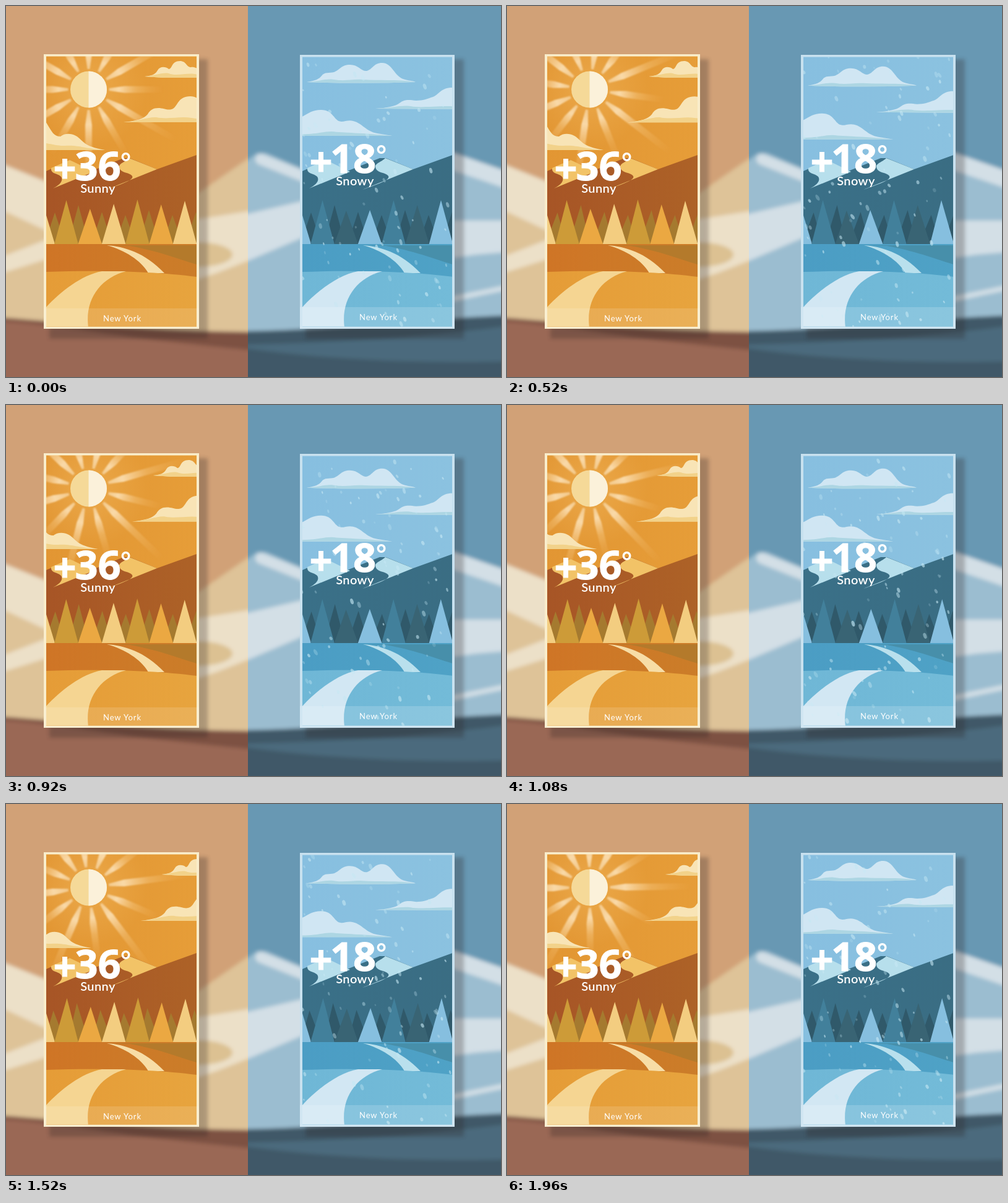
Write an HTML page that moves like this. It is 800 px wide and 600 px high and loops after 2000 ms.

```html
<!DOCTYPE html>
<html lang="en">
<head>
<meta charset="utf-8">
<title>Weather cards</title>
<style>
  html, body { margin: 0; width: 100%; height: 100%; overflow: hidden; }
  svg { display: block; width: 800px; height: 600px; }
  text { font-family: Lato, "Open Sans", sans-serif; fill: #fff; text-anchor: middle; }
  .big { font-family: "Open Sans", "Noto Sans", sans-serif; font-size: 65px; font-weight: 700; stroke: #fff; }
  .deg { font-size: 40px; font-weight: 700; }
  .sky { font-size: 20px; font-weight: 600; letter-spacing: .4px; }
  .city { font-size: 13px; letter-spacing: .9px; }
</style>
</head>
<body>
<svg id="stage" viewBox="0 0 800 600" xmlns="http://www.w3.org/2000/svg"></svg>
<script>
const LOOP = 2000, STEP = 40;
const stage = document.getElementById('stage');

let seed = 7;
const rnd = () => (seed = (seed * 16807) % 2147483647) / 2147483647;
const range = (a, b) => a + (b - a) * rnd();

const path = (d, fill, extra = '') => `<path d="${d}" fill="${fill}" ${extra}/>`;
const rect = (x, y, w, h, fill, extra = '') =>
  `<rect x="${x}" y="${y}" width="${w}" height="${h}" fill="${fill}" ${extra}/>`;
const line = (d, color, width) =>
  `<path d="${d}" fill="none" stroke="${color}" stroke-width="${width}" stroke-linecap="round"/>`;
const label = (x, y, cls, s) => `<text x="${x}" y="${y}" class="${cls}">${s}</text>`;
const gradient = (id, a, b, dir = 'x2="1" y2="0"') =>
  `<linearGradient id="${id}" ${dir}><stop stop-color="${a}"/><stop offset="1" stop-color="${b}"/></linearGradient>`;

const warm = {
  id: 'w', x: 0, top: 78, width: 251, strip: 489, stripAlpha: .13, border: '#f9edcb',
  sky: ['#e29633', '#e69d38'], rock: ['#a75526', '#ad6227'], snow: '#f2c367',
  backTree: '#a57a2f', front: ['#cd9b38', '#eba842', '#f3cd80', '#cd9b38', '#eba842', '#f3cd80'],
  tips: [314, 328, 320, 313, 321, 315],
  field: ['#cf7526', '#cb7d29'], slope: '#b47a2b', near: ['#e59c37', '#e7a43e'],
  road: '#f5d592', farRoad: '#f7dda6'
};
const cold = {
  id: 'c', x: 414, top: 79, width: 250, strip: 487, stripAlpha: .16, border: '#c8e1ef',
  sky: ['#87bfe0', '#8bc2e0'], rock: ['#3a7088', '#3a6d83'], snow: '#b7dfec',
  backTree: '#30596a', front: ['#42809b', '#396474', '#86bfdf', '#42809b', '#396474', '#86bfdf'],
  tips: [314, 331, 330, 314, 322, 314],
  field: ['#4b9dc4', '#4fa2c6'], slope: '#478faa', near: ['#6fb7d6', '#73bbd8'],
  road: '#d2e7f3', farRoad: '#b9e0ed'
};

function backdrop() {
  const left = rect(-20, -20, 440, 640, '#d1a177') +
    path('M-20 250L61 283L200 380L312 302L391 247L420 228V620H-20Z', '#dec398') +
    path('M-20 250L0 258L80 290V370L0 333L-20 325Z', '#ece0c8') +
    path('M-20 410L0 403L80 372V405L0 430L-20 435Z', '#ece0c8') +
    path('M290 348L391 332L420 328V400L391 412L340 432L290 448Z', '#ece0c8') +
    `<ellipse cx="308" cy="402" rx="58" ry="20" fill="#dcc192"/>` +
    path('M-20 503C100 512 250 526 391 527H420V620H-20Z', '#7d5143') +
    path('M-20 509C60 513 120 525 200 535S350 552 391 556L420 558V620H-20Z', '#9a6754');
  const right = rect(370, -20, 450, 640, '#6798b3') +
    path('M370 264L406 238H420L480 264L600 340L715 244H735L820 272V620H370Z', '#9bbdd0') +
    line('M412 248L490 279', '#d3dfe6', 18) +
    line('M715 249L820 285', '#d3dfe6', 27) +
    path('M370 341L391 336L490 313V370L391 412L370 420Z', '#d3dfe6') +
    path('M715 347H820V397L760 402L715 408Z', '#d3dfe6') +
    line('M715 475L820 453', '#d3dfe6', 8) +
    path('M370 526C520 526 650 506 820 500V620H370Z', '#3f5868') +
    path('M370 548C500 545 650 540 820 516V574C700 579 520 574 370 551Z', '#4b6a7d');
  return `<g clip-path="url(#leftHalf)"><g filter="url(#soft)">${left}</g></g>
    <g clip-path="url(#rightHalf)"><g filter="url(#soft)">${right}</g></g>`;
}

function land(p) {
  const url = k => `url(#${p.id}${k})`;
  return path('M65 267L74 263L103 249L135 268L190 246L200 246L244 264L308 241V390H65Z', url('rock')) +
    path('M73 262L103 249L142 268L76 295C88 289 93 282 89 276C83 270 72 272 73 262Z', p.snow) +
    path('M199 246L244 264L162 297C190 287 207 281 204 275C199 268 183 271 183 259C184 254 193 252 199 246Z', p.snow) +
    `<g id="${p.id}trees"></g>` +
    rect(65, 385, 243, 60, url('field')) +
    path('M165 387H308V418C275 408 245 396 200 388Z', p.slope) +
    path('M163 387C190 389 224 398 256 432H230C218 411 192 395 163 387Z', p.farRoad) +
    path('M65 430C150 427 240 429 308 438V520H65Z', url('near')) +
    path('M194 429H155C122 435 88 462 65 487V520H133C127 475 152 440 194 429Z', p.road);
}

// Trees keep their feet still while the tips sway.
function trees(p, t) {
  const sway = Math.sin(2 * Math.PI * t);
  const tree = (x, y, half, fill, lean) =>
    path(`M${x - half} 385L${x + lean} ${y}L${x + half} 385Z`, fill);
  const backs = [334, 322, 333, 338, 330, 338, 333]
    .map((y, i) => tree(79 + 38 * i, y, 17, p.backTree, 2.5 * sway)).join('');
  const fronts = p.tips
    .map((y, i) => tree(97.5 + 38.3 * i, y, 19.3, p.front[i], -sway)).join('');
  return backs + tree(60, 322, 19, p.front[2], 0) + fronts;
}

const cloud = (id, body, shade, colors) =>
  `<g id="${id}">${path(body, colors[0])}${path(shade, colors[1])}</g>`;

function warmSky() {
  const c = ['#f8e4b6', '#f2d28a'];
  let rays = '';
  for (let i = 0; i < 12; i++) {
    const end = i % 2 ? 165 : 122;
    rays += path(`M33 -2L58 -5.5L${end} -5V5L58 5.5L33 2Z`, 'url(#ray)', `transform="rotate(${i * 30})"`);
  }
  return `<g transform="translate(133.5 135)">
      <circle r="95" fill="url(#halo)"/>
      <g id="rays" filter="url(#glow)">${rays}</g>
      <circle r="29.5" fill="#f5d998"/><path d="M0-29.5A29.5 29.5 0 0 1 0 29.5Z" fill="#fbf1da"/></g>` +
    cloud('wa', 'M224 114C236 113 242 110 245 104C249 97 258 98 263 102C269 102 267 89 281 89C292 89 291 99 299 99C306 98 314 103 322 110L340 116H255Z',
      'M224 114C240 113 252 107 263 109C275 114 290 108 305 110L340 116H255Z', c) +
    cloud('wb', 'M190 188C212 186 223 182 229 175C233 168 238 165 246 165C256 165 262 170 270 166C278 161 278 146 298 146C318 146 316 168 345 188Z',
      'M190 188C213 187 228 179 243 180C262 184 280 178 300 181L345 188Z', c) +
    cloud('wc', 'M20 233V170C45 170 58 177 66 190C74 203 77 211 88 211C94 206 104 205 113 210C125 217 124 227 160 233Z',
      'M20 233V222C60 216 76 227 95 226C115 224 130 231 160 233Z', c);
}

function coldSky() {
  const c = ['#d0e6f3', '#add6e3'];
  return cloud('ca', 'M72 123C86 121 92 118 96 113C101 106 108 109 116 107C126 103 128 95 142 95C156 95 160 106 169 105C178 103 180 92 194 92C211 92 213 115 231 119C238 121 244 121 248 123Q160 126 72 123Z',
      'M72 123C92 122 102 117 116 119C135 122 145 118 162 119C190 121 215 118 248 123Q160 126 72 123Z', c) +
    cloud('cb', 'M183 166C201 165 216 162 222 157C231 150 238 152 249 153C260 153 267 150 276 147C286 143 289 132 307 132H330V167Z',
      'M183 166C210 165 222 160 240 162C260 166 280 160 330 163V167Z', c) +
    cloud('cc', 'M50 210V185C72 178 76 168 95 168C116 168 115 186 128 187C134 187 140 184 147 186C161 189 168 203 186 206L210 210Z',
      'M50 210V207C85 209 95 203 112 203C132 205 160 205 210 210Z', c);
}

function card(p, sky, texts) {
  const pane = `${p.id}pane`;
  return `<g transform="translate(${p.x} 0)">
    <clipPath id="${pane}">${rect(65, p.top + 3.5, p.width - 8, 518.5 - p.top - 3.5, '#000')}</clipPath>
    ${rect(70, 86, 256, 452, '#2b2320', 'opacity=".27" filter="url(#shadow)"')}
    ${rect(61, p.top, p.width, 522 - p.top, p.border)}
    <g clip-path="url(#${pane})">${rect(65, 81, 243, 438, `url(#${p.id}sky)`)}${sky}${land(p)}
      ${p === cold ? '<g id="snow"></g>' : ''}</g>
    ${rect(61, p.strip, p.width, 522 - p.strip, '#fff', `opacity="${p.stripAlpha}"`)}
  </g>${texts}`;
}

const flakes = Array.from({ length: 90 }, () => ({
  x: range(62, 312), y: range(0, 450), drift: range(-14, 8),
  size: range(1.1, 2.8), long: range(1.2, 2.1), tilt: range(-38, -12), alpha: range(.18, .65)
}));

function snow(t) {
  return flakes.map(f => {
    const y = (f.y + 450 * t) % 450, x = f.x + f.drift * Math.sin(Math.PI * y / 450);
    return `<ellipse rx="${f.size}" ry="${f.size * f.long}" opacity="${f.alpha}" ` +
      `transform="translate(${x} ${75 + y}) rotate(${f.tilt})"/>`;
  }).join('');
}

const cardGradients = p => gradient(p.id + 'sky', ...p.sky) + gradient(p.id + 'rock', ...p.rock) +
  gradient(p.id + 'field', ...p.field) + gradient(p.id + 'near', ...p.near);
const blur = (id, d, area = '') => `<filter id="${id}" ${area}><feGaussianBlur stdDeviation="${d}"/></filter>`;

stage.innerHTML = `<defs>
  ${blur('soft', 3)}${blur('shadow', 3)}
  ${blur('glow', 1.3, 'filterUnits="userSpaceOnUse" x="-190" y="-190" width="380" height="380"')}
  <clipPath id="leftHalf">${rect(0, 0, 391, 600, '#000')}</clipPath>
  <clipPath id="rightHalf">${rect(391, 0, 409, 600, '#000')}</clipPath>
  <radialGradient id="halo"><stop offset=".25" stop-color="#f7c16a" stop-opacity=".3"/>
    <stop offset="1" stop-color="#f7c16a" stop-opacity="0"/></radialGradient>
  <linearGradient id="ray"><stop stop-color="#fff0d2" stop-opacity=".5"/>
    <stop offset=".18" stop-color="#ffeccb" stop-opacity=".75"/>
    <stop offset=".5" stop-color="#fbd69b" stop-opacity=".32"/>
    <stop offset="1" stop-color="#f5bd69" stop-opacity="0"/></linearGradient>
  ${cardGradients(warm)}${cardGradients(cold)}</defs>` +
  backdrop() +
  card(warm, warmSky(), label(95, 286, 'big', '+') + label(148.5, 282, 'big', '36') +
    label(193.5, 267, 'deg', '°') + label(148.5, 302, 'sky', 'Sunny') + label(188, 510, 'city', 'New York')) +
  card(cold, coldSky(), label(509, 275, 'big', '+') + label(561, 270, 'big', '18') +
    label(606.5, 255, 'deg', '°') + label(564, 290, 'sky', 'Snowy') + label(602, 508, 'city', 'New York'));

const el = id => document.getElementById(id);
el('snow').setAttribute('fill', '#c6e8f4');
const move = (id, x, y) => el(id).setAttribute('transform', `translate(${x} ${y})`);

function draw(t) {
  const glide = (1 - Math.cos(Math.PI * t)) / 2;
  const bob = 11 * (1 - Math.cos(2 * Math.PI * t)) / 2;
  el('rays').setAttribute('transform', `rotate(${30 * t})`);
  move('wa', 32 * glide, 0);
  move('wb', 32 * glide, glide);
  move('wc', -26 * glide, 0);
  for (const id of ['ca', 'cb', 'cc']) move(id, 0, bob);
  for (const p of [warm, cold]) el(p.id + 'trees').innerHTML = trees(p, t);
  el('snow').innerHTML = snow(t);
}

function tick() {
  const ms = performance.now() % LOOP;
  draw(Math.floor(ms / STEP) * STEP / LOOP);
  requestAnimationFrame(tick);
}
tick();
</script>
</body>
</html>
```
